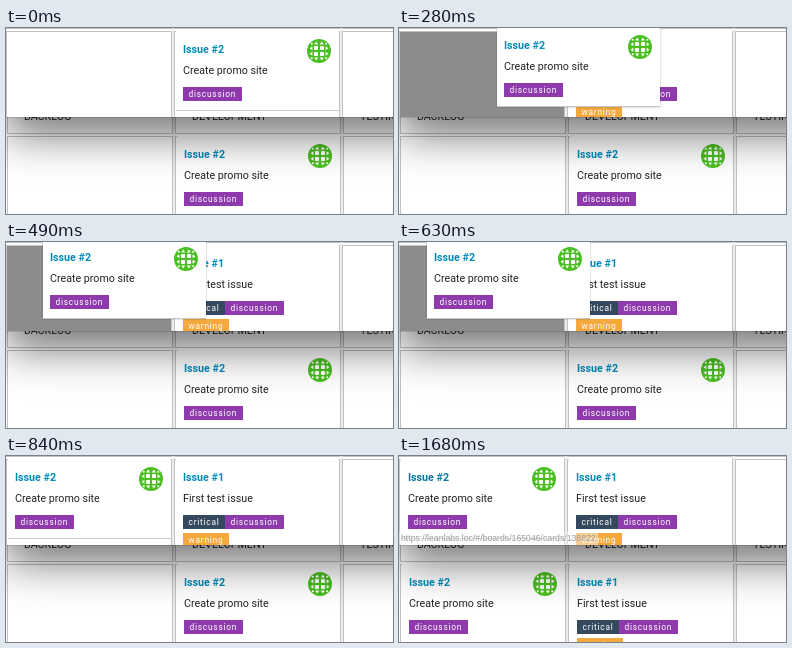
Write an HTML page that moves like this. It is 387 by 186 pixels and loops after 1750 ms.

```html
<!DOCTYPE html>
<html lang="en">
<head>
<meta charset="utf-8">
<title>Board sync</title>
<style>
  html, body { margin: 0; width: 100%; height: 100%; overflow: hidden; background: #fff; }
  body { position: relative; font: 10.7px/14px Roboto, sans-serif; color: #222; }
  body * { position: absolute; box-sizing: border-box; white-space: nowrap; }

  .window { overflow: hidden; background: #fff; }
  .front {
    left: 0; top: 0; width: 520px; height: 88.5px;
    box-shadow: 0 0 0 .5px rgba(0,0,0,.25), 0 18px 44px rgba(0,0,0,.55);
  }
  .back { left: 0; top: 0; width: 100%; height: 100%; }
  .board { left: 0; top: 0; width: 520px; height: 200px; }
  .back .board { left: 1px; top: 105px; }

  .head, .cell { width: 166px; border: 1px solid #c2c2c2; background: #fff; }
  .head { top: -40px; height: 41px; }
  .head span { left: 16px; top: 15.5px; }
  .cell { top: 2.5px; height: 220px; }
  .gap { top: -40px; height: 260px; width: 2px; background: #ececec; }

  .card {
    left: 170px; top: 3px; width: 163px; height: 79.5px;
    background: #fff; border-bottom: 1px solid #c8c8c8;
  }
  .card.tall { height: 100px; }
  .card b { left: 7px; top: 11.5px; color: #008cba; }
  .card p { left: 7px; top: 32.5px; margin: 0; }
  .card svg { left: 130.5px; top: 8px; width: 24px; height: 24px; }
  .tags { left: 7px; top: 56px; width: 140px; }
  .tags i {
    position: static; float: left; height: 14px; margin-bottom: 4px; padding: 0 5.5px;
    font: 8.4px/14px Roboto, sans-serif; letter-spacing: .75px; color: #fff;
  }
  .discussion { background: #8e3aad; }
  .critical { background: #34495e; }
  .warning { background: #f4a83e; }

  .zone { top: 3.5px; width: 164px; height: 200px; background: rgba(0,0,0,.45); visibility: hidden; }
  .zone.from { left: 169px; }
  .zone.to { left: 1px; }
  .url {
    left: 0; top: 76px; width: 199px; height: 14px; padding-left: 2px;
    font: 8.7px/13px "Liberation Sans", Arial, sans-serif;
    color: #999; background: rgba(255,255,255,.45); visibility: hidden;
  }

  /* 4% of the loop is one 70 ms step */
  .front .moved, .front .tall, .front .moved b, .zone, .url, .back .card {
    animation: 1750ms step-end infinite;
  }
  .front .moved { animation-name: drag; }
  .front .moved b { animation-name: hover; }
  .front .tall { animation-name: rise; }
  .zone.from { animation-name: leave; }
  .zone.to { animation-name: enter; }
  .url { animation-name: status; }
  .back .moved { animation-name: sync; }
  .back .tall { animation-name: appear; }

  @keyframes drag {
    0% { transform: none; box-shadow: none; }
    12% { transform: translate(-22px, -1px); box-shadow: 0 0 2px rgba(0,0,0,.3); }
    16% { transform: translate(-72px, -4px); box-shadow: 0 0 2px rgba(0,0,0,.3); }
    20% { transform: translate(-118px, -6px); box-shadow: 0 0 2px rgba(0,0,0,.3); }
    24% { transform: translate(-126px, -6px); box-shadow: 0 0 2px rgba(0,0,0,.3); }
    28% { transform: translate(-133px, -6px); box-shadow: 0 0 2px rgba(0,0,0,.3); }
    32% { transform: translate(-138px, -6px); box-shadow: 0 0 2px rgba(0,0,0,.3); }
    36% { transform: translate(-142px, -6px); box-shadow: 0 0 2px rgba(0,0,0,.3); }
    40% { transform: translate(-146px, -6px); box-shadow: 0 0 2px rgba(0,0,0,.3); }
    48%, 100% { transform: translate(-168px, 0); box-shadow: none; }
  }
  @keyframes hover { 0% { color: #008cba; } 84%, 100% { color: #0078a0; } }
  @keyframes rise { 0% { visibility: hidden; } 12%, 100% { visibility: visible; } }
  @keyframes leave { 0% { visibility: hidden; } 12% { visibility: visible; } 16%, 100% { visibility: hidden; } }
  @keyframes enter { 0% { visibility: hidden; } 16% { visibility: visible; } 48%, 100% { visibility: hidden; } }
  @keyframes status { 0% { visibility: hidden; } 96%, 100% { visibility: visible; } }
  @keyframes sync { 0% { transform: none; } 80%, 100% { transform: translate(-168px, 0); } }
  @keyframes appear { 0% { visibility: hidden; } 80%, 100% { visibility: visible; } }
</style>
</head>
<body>
<div class="window back"><div class="board"></div></div>
<div class="window front">
  <div class="board"></div>
  <div class="url">https://leanlabs.loc/#/boards/165046/cards/138822</div>
</div>
<script>
  const PITCH = 168;

  const column = (name, i) => `
    <div class="head" style="left:${i * PITCH}px"><span>${name}</span></div>
    <div class="cell" style="left:${i * PITCH}px"></div>
    <div class="gap" style="left:${i * PITCH + 166}px"></div>`;

  const tags = names => names.map(n => `<i class="${n}">${n}</i>`).join('');

  const card = (cls, id, text, labels, extra = '') => `
    <div class="card ${cls}"><b>Issue #${id}</b><p>${text}</p>
    <div class="tags">${tags(labels)}</div>${extra}</div>`;

  // one quarter of the badge, turned four times
  const quarter = [0, 90, 180, 270].map(a => `<g transform="rotate(${a})">
    <rect x="1" y="-5" width="4" height="4" rx=".8"/>
    <path d="M-4.8-6.6L-2.8-9.4-.8-6.6zM.8-6.6L2.8-9.4 4.8-6.6z"/>
    <circle cx="7.2" cy="-7.2" r="1"/></g>`).join('');
  const avatar = `<svg viewBox="-12 -12 24 24"><circle r="12" fill="#4bbf22"/>
    <g fill="#fff">${quarter}</g></svg>`;

  const board = ['BACKLOG', 'DEVELOPMENT', 'TESTING'].map(column).join('') +
    card('tall', 1, 'First test issue', ['critical', 'discussion', 'warning']);
  const moved = card('moved', 2, 'Create promo site', ['discussion'], avatar);
  const zones = '<div class="zone from"></div><div class="zone to"></div>';

  document.querySelector('.back .board').innerHTML = board + moved;
  document.querySelector('.front .board').innerHTML = board + zones + moved;
</script>
</body>
</html>
```
